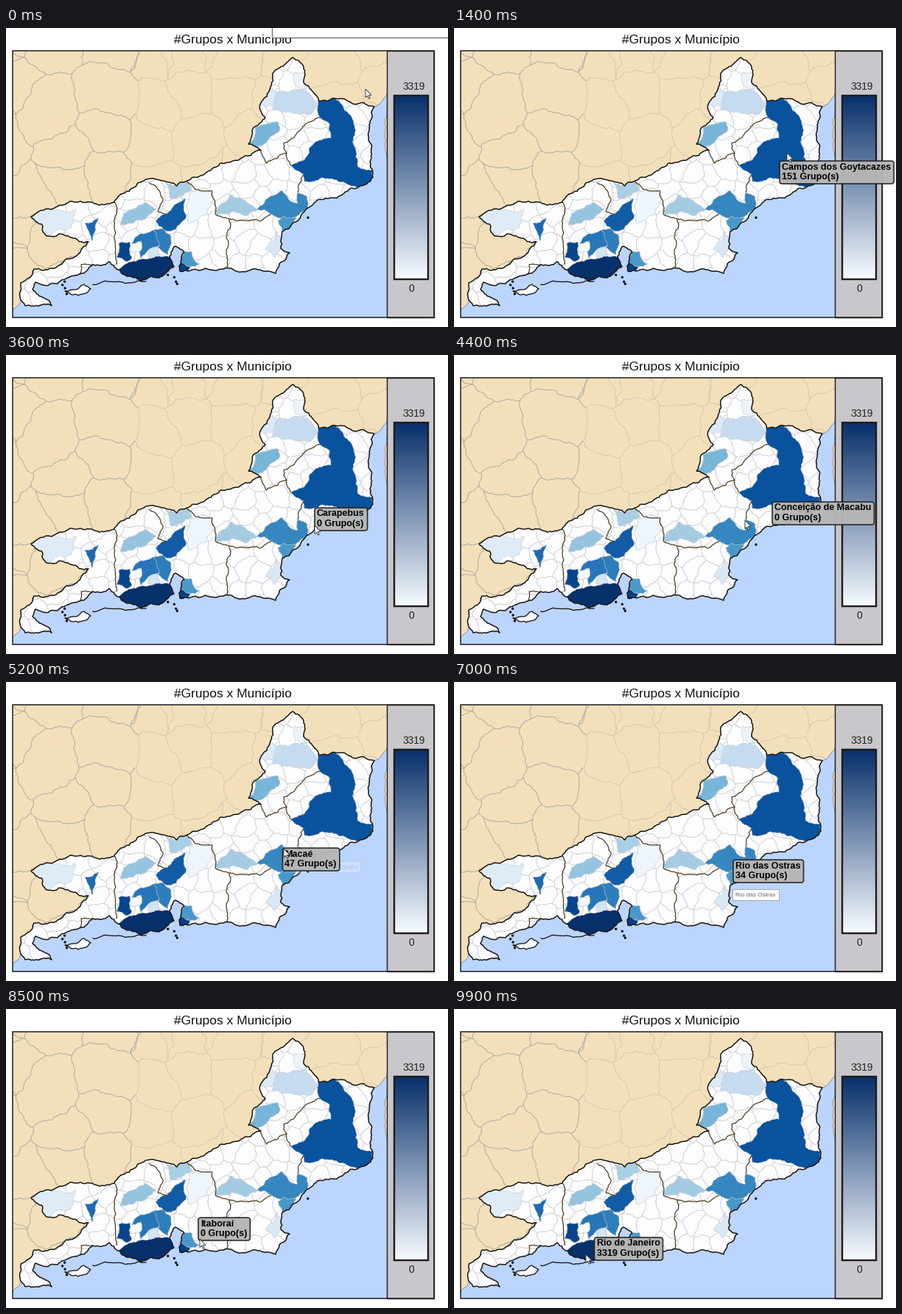
These frames come from a looping animation (600 by 407 pixels, 10 s). A matplotlib script:

```python
import random

import matplotlib.pyplot as plt
import numpy as np
from matplotlib.animation import FuncAnimation
from matplotlib.collections import LineCollection
from matplotlib.colors import LinearSegmentedColormap
from matplotlib.patches import FancyBboxPatch, Polygon, Rectangle

W, H, DPI = 600, 407, 100
PX = 72 / DPI
FRAMES, STEP = 100, 100
BLUES = plt.get_cmap("Blues")
INK = "#17140f"

fig = plt.figure(figsize=(W / DPI, H / DPI), dpi=DPI, facecolor="white")
ax = fig.add_axes([0, 0, 1, 1])
ax.axis("off")


def pts(*v):
    return list(zip(v[::2], v[1::2]))


def bend(a, b):
    """Crinkle an edge; the same two ends always give the same bends."""
    a, b = sorted([tuple(a), tuple(b)])
    dx, dy = b[0] - a[0], b[1] - a[1]
    if np.hypot(dx, dy) < 4:
        return [a, b]
    k = random.Random(f"{a}{b}").uniform(-0.15, 0.15)
    mid = ((a[0] + b[0]) / 2 - k * dy, (a[1] + b[1]) / 2 + k * dx)
    first, last = bend(a, mid), bend(mid, b)
    if first[0] != a:
        first.reverse()
    if last[0] != mid:
        last.reverse()
    return first + last[1:]


def rough(path):
    out = [path[0]]
    for a, b in zip(path, path[1:]):
        edge = bend(a, b)
        out += edge[1:] if edge[0] == tuple(a) else edge[-2::-1]
    return out


def area(path, color, edge="none", lw=0.0, z=1, clip=None):
    p = Polygon(rough(path + path[:1]), fc=color, ec=edge, lw=lw * PX, zorder=z,
                joinstyle="round")
    ax.add_patch(p)
    if clip is not None:
        p.set_clip_path(clip)
    return p


def lines(paths, color, lw, z, clip):
    c = LineCollection([rough(p) for p in paths], colors=color,
                       linewidths=lw * PX, zorder=z)
    ax.add_collection(c)
    c.set_clip_path(clip)


def box(x, y, w, h, fill, edge, lw, z):
    return ax.add_patch(Rectangle((x, y), w, h, fc=fill, ec=edge, lw=lw * PX,
                                  zorder=z))


def label(x, y, s, px, z=5, **kw):
    return ax.text(x, y, s, fontsize=px * PX, zorder=z,
                   family="Liberation Sans", va="baseline", **kw)


def cut(poly, mid, away):
    """Keep the part of a polygon behind the line through mid."""
    out = []
    for p, q in zip(poly, poly[1:] + poly[:1]):
        dp, dq = np.dot(p - mid, away), np.dot(q - mid, away)
        if dp <= 0:
            out.append(p)
        if (dp <= 0) != (dq <= 0):
            out.append(p + (q - p) * dp / (dp - dq))
    return out


def cell_borders(x0, y0, x1, y1, step, seed):
    """Edges between the cells around jittered grid points."""
    rng = random.Random(seed)
    sites = [np.array([x + rng.uniform(-0.4, 0.4) * step,
                       y + rng.uniform(-0.4, 0.4) * step])
             for x in np.arange(x0, x1 + step, step)
             for y in np.arange(y0, y1 + step, step)]
    edges = set()
    for s in sites:
        cell = [s + step * np.array(c) for c in pts(-2, -2, 2, -2, 2, 2, -2, 2)]
        for o in sites:
            if 0 < np.hypot(*(o - s)) < 3 * step:
                cell = cut(cell, (s + o) / 2, o - s)
        ring = [tuple(int(round(v)) for v in p) for p in cell]
        edges |= {tuple(sorted(e)) for e in zip(ring, ring[1:] + ring[:1])}
    return [list(e) for e in sorted(edges) if e[0] != e[1]]


# Land, neighbouring borders and sea
frame = box(9, 31, 508, 363, "#f3e0bb", "none", 0, 0)
around = cell_borders(9, 31, 517, 280, 62, 4)
lines([e for e in around if e[0][0] < 170], "#b0aca2", 1, 1, frame)
lines([e for e in around if e[0][0] >= 170], "#d3c9b4", 1, 1, frame)
area(pts(530, 70, 517, 90, 500, 107, 440, 180, 250, 290, 118, 310, 70, 325,
         35, 338, 24, 360, 18, 376, 5, 392, 5, 420, 530, 420),
     "#bbd5ff", "#8c8a80", 0.8, 2, frame)

# State outline, clockwise from the west
north = pts(34, 257, 62, 247, 95, 237, 120, 239, 147, 237, 160, 225, 187, 208,
            212, 208, 232, 215, 246, 208, 282, 190, 318, 178, 346, 166,
            329, 158, 338, 134, 352, 122, 345, 104, 359, 80, 362, 62, 389, 40,
            404, 53, 404, 74, 424, 99, 447, 96, 470, 103, 500, 107)
coast = pts(493, 140, 494, 182, 498, 203, 478, 217, 438, 232, 409, 245,
            390, 265, 375, 277, 373, 300, 385, 306, 371, 321, 366, 334,
            310, 330, 270, 327, 236, 331, 242, 305, 230, 297, 222, 312,
            228, 325, 212, 338, 183, 345, 166, 338, 152, 329, 140, 318,
            118, 322, 100, 335, 70, 348, 40, 346, 36, 356, 62, 378, 42, 378,
            26, 378, 19, 366, 20, 347, 38, 328, 82, 314, 112, 291, 88, 285,
            55, 283)
state = area(north + coast, "#fdfdff", z=3)
lines(cell_borders(20, 45, 500, 380, 25, 9), "#c9c9cf", 0.9, 4, state)

# Shaded municipalities: share of the colour scale, then corners
SHADES = [
    (0.87, pts(424, 99, 447, 96, 463, 114, 473, 161, 478, 189, 498, 193,
               498, 203, 478, 217, 454, 210, 405, 209, 404, 199, 386, 187,
               404, 180, 412, 163, 441, 150, 439, 130, 426, 122)),
    (0.67, pts(340, 247, 353, 233, 375, 221, 387, 236, 396, 238, 396, 224,
               409, 230, 409, 245, 394, 257, 360, 253)),
    (0.6, pts(369, 262, 377, 256, 394, 257, 390, 265, 375, 277)),
    (0.36, pts(284, 250, 304, 227, 318, 231, 341, 248, 325, 256, 287, 255)),
    (0.25, pts(362, 88, 404, 84, 424, 103, 412, 118, 390, 116, 362, 112)),
    (0.13, pts(345, 104, 359, 80, 368, 89, 360, 106)),
    (0.06, pts(392, 60, 404, 62, 406, 84, 393, 80)),
    (0.47, pts(329, 161, 338, 134, 370, 128, 372, 137, 356, 152, 340, 163)),
    (0.34, pts(217, 211, 232, 215, 246, 208, 252, 221, 222, 231)),
    (0.83, pts(203, 263, 218, 253, 243, 232, 245, 256, 223, 277, 208, 270)),
    (0.4, pts(155, 268, 160, 252, 190, 237, 204, 246, 170, 266)),
    (0.12, pts(34, 257, 62, 247, 95, 247, 88, 272, 55, 283)),
    (0.77, pts(107, 266, 125, 258, 122, 274, 117, 290, 113, 278)),
    (0.7, pts(200, 275, 213, 273, 224, 283, 220, 309, 208, 300)),
    (0.73, pts(170, 294, 178, 283, 200, 275, 208, 297, 183, 314)),
    (0.18, pts(193, 312, 196, 300, 208, 296, 208, 313)),
    (0.0, pts(168, 292, 183, 290, 182, 304, 170, 306)),
    (0.92, pts(153, 293, 168, 291, 171, 312, 165, 318, 150, 312)),
    (1.0, pts(152, 329, 166, 319, 185, 314, 222, 312, 228, 325, 212, 338,
              183, 345, 166, 338)),
    (0.6, pts(236, 318, 242, 305, 251, 304, 263, 321, 250, 325)),
    (0.94, pts(234, 318, 250, 325, 246, 333, 236, 331)),
    (0.05, pts(250, 224, 268, 217, 282, 228, 272, 254, 247, 265)),
    (0.15, pts(352, 300, 368, 277, 373, 300, 365, 312)),
]
for share, corners in SHADES:
    area(corners, BLUES(share), "#c4c8d2", 0.6, 5, state)

# Region borders and coastline
lines([
    pts(346, 166, 354, 184, 381, 170, 377, 157, 405, 133, 426, 122),
    pts(381, 170, 386, 187), pts(404, 199, 396, 224),
    pts(246, 208, 258, 220, 280, 222, 284, 253, 303, 260, 299, 285, 299, 330),
    pts(303, 260, 345, 263, 360, 253),
    pts(194, 210, 213, 232, 206, 250, 218, 253),
    pts(147, 237, 147, 268, 148, 290, 150, 322), pts(100, 335, 102, 322, 118, 322),
], "#4a3818", 1.2, 6, state)
ax.add_patch(Polygon(state.get_xy(), fc="none", ec=INK, lw=1.5 * PX,
                     joinstyle="round", zorder=7))

# Islands and the sand spit
area(pts(80, 358, 106, 349, 115, 355, 98, 364), "#fdfdff", INK, 1.3, 7)
ax.plot(*zip(*rough(pts(118, 349, 152, 345, 190, 345))), color=INK, lw=1.3 * PX,
        zorder=7)
rng = random.Random(2)
for cx, cy, spread, count in [(226, 342, 7, 4), (78, 352, 10, 4), (409, 258, 1, 1)]:
    for _ in range(count):
        x, y = (c + rng.uniform(-spread, spread) for c in (cx, cy))
        ax.add_patch(plt.Circle((x, y), 1, color=INK, zorder=7))

# Legend panel, outer frame and title
box(517, 31, 64, 363, "#c9c7cb", "#1a1a1a", 1.4, 8)
box(9, 31, 572, 363, "none", "#1a1a1a", 1.5, 8)
ramp = LinearSegmentedColormap.from_list("ramp", ["#f7fbff", "#08306b"])
ax.imshow(np.linspace(1, 0, 250)[:, None], cmap=ramp, aspect="auto",
          extent=(527, 573, 342, 92), zorder=9)
ax.set_xlim(0, W)
ax.set_ylim(H, 0)
box(527, 92, 46, 250, "none", "#1c1c1c", 2.4, 10)
label(553.5, 84.5, "3319", 13.8, 10, ha="center", color="#222222")
label(550, 359, "0", 13.8, 10, ha="center", color="#222222")
label(307.5, 21.5, "#Grupos x Município", 17.4, 10, ha="center", color="#111111")

# Window edge seen only at the start of the loop
window = box(361, -3, 250, 15.5, "white", "#77777c", 1.4, 11)

# Moving parts
hint_box = box(0, 0, 64, 15, "white", "#a5a9b4", 1, 12)
hint_text = label(0, 0, "", 8.3, 13, color="#666666")
tip_box = ax.add_patch(FancyBboxPatch((0, 0), 60, 31, fc="#b5b5b5", ec="#222222",
                                      boxstyle="round,pad=0,rounding_size=3.5",
                                      lw=1.6 * PX, zorder=14))
tip_rows = [label(0, 0, "", 12.5, 15, weight="bold") for _ in range(2)]
ARROW = np.array(pts(0, 0, 0, 11.5, 2.6, 9.2, 4.5, 13.2, 6.2, 12.4,
                     4.4, 8.5, 8, 8.3))
arrow = ax.add_patch(Polygon(ARROW, fc="white", ec="#333333", lw=0.9 * PX,
                             zorder=16))

# Pointer stops: seconds, x, y
STOPS = np.array([
    (0, 488, 83), (1.4, 452, 170), (1.6, 448, 178), (1.8, 448, 178),
    (2.8, 419, 236), (3.0, 419, 236), (3.6, 419, 232), (4.5, 392, 224),
    (5.0, 390, 224), (5.2, 377, 227), (5.6, 372, 240), (5.8, 372, 240),
    (6.5, 379, 268), (6.8, 377, 261), (7.0, 377, 261), (7.7, 323, 300),
    (7.9, 323, 300), (8.5, 263, 313), (8.9, 226, 328), (9.9, 179, 334)])
# The panel stays where the pointer entered: start, name, count, x, y
PLACES = [(0.9, "Campos dos Goytacazes", 151, 442, 181),
          (2.6, "Carapebus", 0, 419, 208),
          (4.2, "Conceição de Macabu", 0, 432, 200),
          (5.0, "Macaé", 47, 375.5, 226),
          (6.4, "Rio das Ostras", 34, 379, 242),
          (7.4, "Silva Jardim", 0, 327, 257),
          (8.2, "Itaboraí", 0, 261, 284),
          (9.4, "Rio de Janeiro", 3319, 190.5, 311)]
# Name, box, fully shown from, until
HINTS = [("Conceição de Macabu", 391, 244, 90, 4.7, 5.0),
         ("Rio das Ostras", 377.5, 281.5, 63, 6.8, 7.1)]
FADE = 0.2


def show_panel(t):
    begun = [p for p in PLACES if p[0] <= t + 1e-6]
    for part in [tip_box, *tip_rows]:
        part.set_visible(bool(begun))
    if not begun:
        return
    start, name, count, x, y = begun[-1]
    strength = min(1, (t - start) / FADE + 0.3)
    wide = 0
    for row, text, base in zip(tip_rows, (name, f"{count} Grupo(s)"), (11.5, 25)):
        row.set_text(text)
        row.set_position((x + 3, y + base))
        row.set_alpha(strength)
        wide = max(wide, row.get_window_extent().width)
    tip_box.set_bounds(x, y, wide + 7, 31)
    tip_box.set_alpha(0.97 * strength)


def show_hint(t):
    strength = 0
    for name, x, y, wide, start, end in HINTS:
        a = np.clip(1 - max(start - t, t - end) / 0.27, 0, 1)
        if a > 0:
            strength = a
            hint_box.set_bounds(x, y, wide, 15)
            hint_text.set_text(name)
            hint_text.set_position((x + 4.5, y + 10.5))
    for part in (hint_box, hint_text):
        part.set_alpha(strength)


def draw(i):
    t = i * STEP / 1000
    window.set_visible(i == 0)
    arrow.set_xy(ARROW + [np.interp(t, STOPS[:, 0], STOPS[:, k]) for k in (1, 2)])
    arrow.set_visible(not 6.8 <= t <= 7.0)
    show_panel(t)
    show_hint(t)
    return []


anim = FuncAnimation(fig, draw, frames=FRAMES, interval=STEP, repeat=True,
                     repeat_delay=0, blit=False)
plt.show()
```
